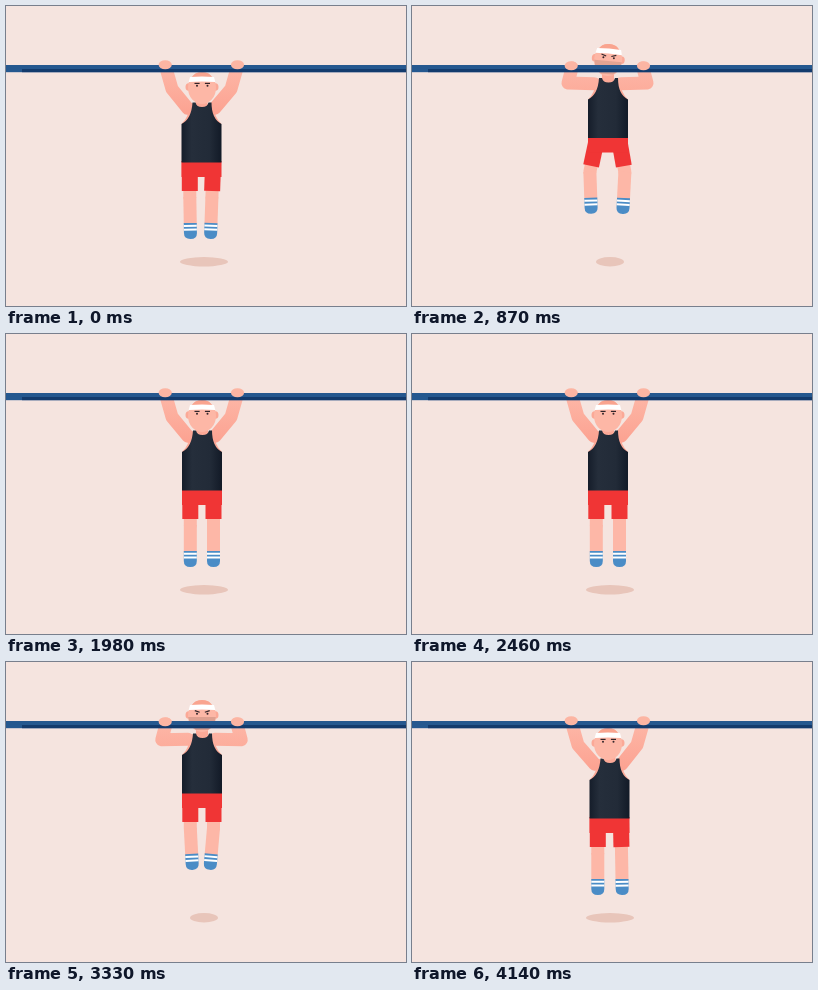
These frames come from a looping animation (400x300 px, 4200 ms). An HTML page:

```html
<!DOCTYPE html>
<html lang="en">
<head>
<meta charset="utf-8">
<title>Pull-ups</title>
<style>
  html, body { margin: 0; width: 100%; height: 100%; overflow: hidden; background: #f5e4df; }
  svg { display: block; width: 100%; height: 100%; }
</style>
</head>
<body>
<svg viewBox="0 0 400 300">
  <defs>
    <linearGradient id="shirt">
      <stop offset="0" stop-color="#151d2a"/>
      <stop offset=".25" stop-color="#252e3b"/>
      <stop offset=".7" stop-color="#222b38"/>
      <stop offset="1" stop-color="#121a27"/>
    </linearGradient>
    <linearGradient id="skin" gradientUnits="userSpaceOnUse" x1="0" y1="60" x2="0" y2="106">
      <stop offset="0" stop-color="#fdb7a7"/>
      <stop offset="1" stop-color="#fca392"/>
    </linearGradient>
    <g id="leg">
      <path d="M0 0V31" stroke="#fdb7a7" stroke-width="13" stroke-linecap="round"/>
    </g>
    <g id="shin">
      <path d="M-6.5 0H6.5V27H-6.5Z" fill="#fdb7a7"/>
      <path d="M-6.5 26H6.5V36Q6.5 42 0 42T-6.5 36Z" fill="#4a8cc6"/>
      <path d="M-6.5 28.8H6.5M-6.5 32.6H6.5" stroke="#fff" stroke-width="2"/>
    </g>
  </defs>
  <rect width="400" height="300" fill="#f5e4df"/>
  <ellipse id="shadow" cx="198" cy="255.8" ry="4.7" fill="#e8c5ba"/>
  <g id="legs" fill="none"></g>
  <g id="trunk">
    <path d="M176 155H216V171H176Z" fill="#f03535"/>
    <path d="M190 90H202V98L207 97Q209 112 216 118H176Q183 112 185 97L190 98Z" fill="#fca997"/>
  </g>
  <g id="arms" fill="none" stroke="url(#skin)" stroke-width="13" stroke-linejoin="round" stroke-linecap="round">
    <path/><path/>
  </g>
  <path id="vest" fill="url(#shirt)" d="M187 96.5H190Q191 101 196.5 101T203 96.5H206Q206 113 216 118V156.5H176V118Q186 113 187 96.5Z"/>
  <g id="head">
    <ellipse cx="182.5" cy="81" rx="3" ry="3.8" fill="#fba997"/>
    <ellipse cx="209.5" cy="81" rx="3" ry="3.8" fill="#fba997"/>
    <ellipse cx="196" cy="82" rx="14" ry="16" fill="#fdb7a6"/>
    <path d="M185.5 72Q188 66 196 66T206.5 72Z" fill="#f9a48f"/>
    <path id="shade" d="M182.2 83H209.8Q209 91 202 96H190Q183 91 182.2 83Z" fill="#b98576"/>
    <path d="M184 71Q196 70 208 71L209.3 76Q196 75 182.7 76Z" fill="#fff"/>
    <g fill="#33252a">
      <circle cx="191" cy="79.7" r="1"/>
      <circle cx="201.5" cy="79.7" r="1"/>
    </g>
    <g stroke="#33252a" stroke-width="1.2">
      <path id="browL" d="M188.5 77.4H193.6"/>
      <path id="browR" d="M198.9 77.4H204"/>
    </g>
  </g>
  <rect y="59" width="400" height="7.2" fill="#25588f"/>
  <rect x="16" y="63" width="384" height="3.2" fill="#133b6d"/>
  <g id="hands" fill="#fcb5a3">
    <ellipse cx="159.2" rx="6.6" ry="4.5"/>
    <ellipse cx="231.5" rx="6.6" ry="4.5"/>
  </g>
</svg>
<script>
const LOOP = 4200, TICK = 30, CENTER = 195.5;
const $ = id => document.getElementById(id);

// head y, body y, body x, head tilt, frown, shadow radius, left thigh, left shin, right thigh, right shin
const POSES = {
  start:  [0, 0, -.5, 0, 0, 24, 0, 1, -2, -2],
  hang:   [0, 0, 0, 0, 0, 24, 0, 0, 0, 0],
  ready:  [-1, 1.5, 0, 0, 1, 22.5, -8, 2, 8, -2],
  spread: [-28, -24.5, 0, 5, 1, 14, -12, 2, 10, -3],
  mid:    [-18, -17, .3, -4, 1, 19, -10, 5.5, 9, -6],
  kick:   [-1, 2, 1, 0, 1, 22.5, -10, 3, 26, -13],
  tuck:   [-28, -25, 0, 0, 1, 14, 0, 3, 0, -5],
  end:    [0, 0, 1.5, 0, 0, 24, 0, 0, 1, 1]
};
const TIMELINE = [
  [0, 'start'], [180, 'start'], [390, 'ready'], [750, 'spread'], [1410, 'spread'],
  [1620, 'mid'], [1920, 'hang'], [2520, 'hang'], [2820, 'kick'], [3240, 'tuck'],
  [3420, 'tuck'], [3810, 'end'], [4200, 'end']
].map(([time, name]) => ({ time, pose: POSES[name] }));

function slope(i, k) {
  const rate = j => (TIMELINE[j + 1].pose[k] - TIMELINE[j].pose[k]) / (TIMELINE[j + 1].time - TIMELINE[j].time);
  if (i === 0 || i === TIMELINE.length - 1) return 0;
  const a = rate(i - 1), b = rate(i);
  return a * b > 0 ? 2 * a * b / (a + b) : 0;
}

// Monotone cubic blend: smooth through the poses, no overshoot.
function poseAt(t) {
  let i = 0;
  while (i < TIMELINE.length - 2 && t >= TIMELINE[i + 1].time) i++;
  const from = TIMELINE[i], to = TIMELINE[i + 1];
  const span = to.time - from.time, u = (t - from.time) / span;
  return from.pose.map((v, k) => {
    const w = u * u * (3 - 2 * u);
    return v + (to.pose[k] - v) * w
      + span * (slope(i, k) * u * (1 - u) ** 2 - slope(i + 1, k) * u * u * (1 - u));
  });
}

function legMarkup(x, y, thigh, shin) {
  const rad = thigh * Math.PI / 180;
  const kneeX = x + 31 * Math.sin(rad), kneeY = y + 31 * Math.cos(rad);
  return `<use href="#leg" transform="translate(${x} ${y}) rotate(${-thigh})"/>
    <use href="#shin" transform="translate(${kneeX} ${kneeY}) rotate(${-shin})"/>
    <path d="M-8 -3H8V25H-8Z" fill="#f03535" transform="translate(${x} ${y}) rotate(${-thigh})"/>`;
}

function draw(t) {
  const [headY, bodyY, bodyX, tilt, frown, radius, thighL, shinL, thighR, shinR] = poseAt(t);
  const lift = Math.max(0, -bodyY / 24.5);
  const move = `translate(${bodyX} ${bodyY})`;

  $('shadow').setAttribute('rx', radius);
  $('trunk').setAttribute('transform', move);
  $('vest').setAttribute('transform', move);
  $('legs').innerHTML = legMarkup(184.3 + bodyX, 160 + bodyY, thighL, shinL)
    + legMarkup(207.5 + bodyX, 160 + bodyY, thighR, shinR);

  const elbowX = 29.5 + 10 * lift;
  const elbowY = 83 - 46.6 * lift + 40.6 * lift * lift;
  [...$('arms').children].forEach((arm, i) => {
    const side = i ? 1 : -1;
    const at = (dx, y) => `${CENTER + side * dx} ${y}`;
    const shoulder = `${CENTER + side * 13.5 + bodyX * .5} ${102.3 + bodyY}`;
    arm.setAttribute('d', `M${at(35.5, 62)}L${at(elbowX, elbowY)}L${shoulder}`);
  });

  $('head').setAttribute('transform', `translate(0 ${headY}) rotate(${tilt} 196 84)`);
  $('shade').setAttribute('opacity', .4 * lift ** 6);
  $('browL').setAttribute('transform', `rotate(${18 * frown} 191 78)`);
  $('browR').setAttribute('transform', `rotate(${-18 * frown} 201.5 78)`);
  for (const hand of $('hands').children) hand.setAttribute('cy', 58.7 + lift);
}

function frame(now) {
  draw(Math.floor(now % LOOP / TICK) * TICK);
  requestAnimationFrame(frame);
}
draw(0);
requestAnimationFrame(frame);
</script>
</body>
</html>
```
